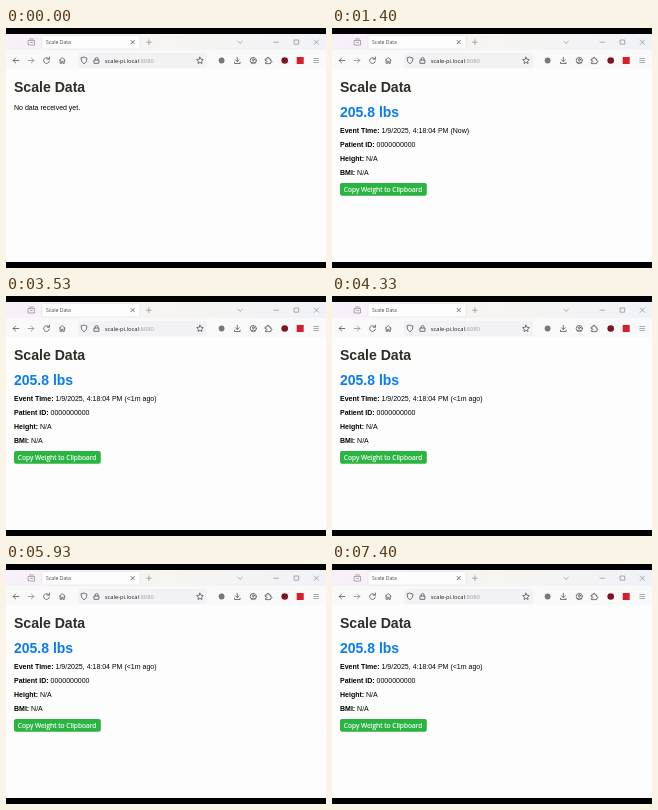
These frames come from a looping animation (320x240 px, 7.47 s). An HTML page:

```html
<!DOCTYPE html>
<html lang="en">
<head>
<meta charset="utf-8">
<title>Scale Data</title>
<style>
  html, body { margin: 0; width: 100%; height: 100%; overflow: hidden; background: #000; }
  svg { display: block; width: 100vw; height: 100vh; }
  text { font-family: "Liberation Sans", Arial, sans-serif; font-size: 7px; fill: #000; white-space: pre; }
  .title { font-size: 14.1px; font-weight: bold; fill: #2e2e28; }
  .weight { font-size: 14px; font-weight: bold; fill: #0a7cf2; }
  .bold { font-weight: bold; }
  .ui { font-family: "Open Sans", "Noto Sans", sans-serif; }
  .icon { fill: none; stroke: #55545a; stroke-width: .8; stroke-linecap: round; stroke-linejoin: round; }
  .faint { stroke: #77767c; stroke-width: .6; }
</style>
</head>
<body>
<svg viewBox="0 0 320 240">
  <defs>
    <linearGradient id="strip">
      <stop offset="0" stop-color="#f8f0fa"/>
      <stop offset=".5" stop-color="#f6f5f1"/>
      <stop offset="1" stop-color="#f1f2f8"/>
    </linearGradient>
  </defs>
  <rect width="320" height="240" fill="#000"/>
  <rect y="6" width="320" height="228" fill="#fdfdfd"/>
  <rect y="6" width="320" height="16" fill="url(#strip)"/>
  <rect y="22" width="320" height="19" fill="#f9f9fa"/>

  <rect x="36" y="7.5" width="98" height="13.5" rx="1.5" fill="#fdfdfe" stroke="#e2e1e6" stroke-width=".6"/>
  <text class="ui" x="40" y="16" style="font-size:5.15px;fill:#4a494f">Scale Data</text>
  <rect x="72" y="25" width="129" height="15" rx="2" fill="#f2f2f4"/>
  <text class="ui" x="98.7" y="34.8" style="font-size:5.8px;fill:#222">scale-pi.local<tspan fill="#a09fa4">:8080</tspan></text>

  <g class="icon">
    <!-- tab strip and window controls -->
    <g class="faint">
      <path d="M22.5 12.5h6v4.5h-6zM23.5 11h4M24.5 14.5h2"/>
      <path d="M140.5 14.2h4.8m-2.4-2.4v4.8M232 13.2l2.2 2.2 2.2-2.2"/>
      <path d="M268 14.2h4.4M288.500 12h4.200v4.200h-4.200zM308.200 12l4.400 4.400m0-4.400l-4.400 4.400"/>
    </g>
    <path d="M125 12.400l3.400 3.400m0-3.400l-3.400 3.400"/>
    <!-- navigation -->
    <path d="M12.800 32.500H7.200m2.500-2.500l-2.500 2.500 2.500 2.500"/>
    <path d="M22.200 32.500h5.600m-2.500-2.500l2.500 2.500-2.500 2.500" stroke="#8d8c93"/>
    <path d="M43 31a2.900 2.900 0 1 0 .4 2.200M43.400 29v2.200h-2.200"/>
    <path d="M53.300 32.300l2.900-2.700 2.900 2.700M54.100 31.800v3.500h1.500v-2h1.200v2h1.500v-3.500"/>
    <!-- address bar -->
    <path d="M78 29.200l3 1q.1 4-3 5.700q-3.100-1.700-3-5.700z"/>
    <path d="M88.300 32h4.600v3.300h-4.600zM89.200 32v-1.100a1.400 1.400 0 0 1 2.800 0V32"/>
    <path d="M194 29.200l1 2.100 2.300.3-1.700 1.600.4 2.300-2-1.100-2 1.100.4-2.300-1.700-1.600 2.300-.3z"/>
    <!-- tools -->
    <path d="M231.300 29.300v4.200m-1.800-1.700l1.800 1.800 1.800-1.800M228.500 34.200v1.300h5.600v-1.300"/>
    <circle cx="247.300" cy="32.500" r="3.100"/>
    <circle cx="247.300" cy="31.700" r="1"/>
    <path d="M245.300 34.700q2-1.800 4 0"/>
    <path d="M259.500 31h1.500q-.4-1.800 1-1.800t1 1.800h1.600v1.600q1.300-.2 1.300.9t-1.300.9v1.200h-5.100v-1.300q1.500-.1 1.500-.9t-1.500-.9z"/>
    <path class="faint" d="M307.800 30.500h4.800m-4.800 2h4.800m-4.800 2h4.800"/>
  </g>
  <circle cx="215.600" cy="32.500" r="2.900" fill="#77767c"/>
  <circle cx="278.700" cy="32.500" r="3.300" fill="#7c1420"/>
  <rect x="290.700" y="29" width="7" height="7" fill="#d5202b"/>

  <text class="title" x="7.900" y="63.800">Scale Data</text>
  <text id="empty" x="8" y="82.200">No data received yet.</text>
  <g id="reading">
    <text class="weight" x="8" y="89.200">205.8 lbs</text>
    <text x="8" y="105.200"><tspan class="bold">Event Time:</tspan> 1/9/2025, 4:18:04 PM (<tspan id="age">Now</tspan>)</text>
    <text x="8" y="119.200"><tspan class="bold">Patient ID:</tspan> 0000000000</text>
    <text x="8" y="133.200"><tspan class="bold">Height:</tspan> N/A</text>
    <text x="8" y="147.200"><tspan class="bold">BMI:</tspan> N/A</text>
    <rect x="8" y="154.900" width="86.800" height="12.900" rx="2" fill="#2bb442"/>
    <text class="ui" x="11.800" y="163.800" style="font-size:6.65px;fill:#fff;stroke:#fff;stroke-width:.15">Copy Weight to Clipboard</text>
  </g>
</svg>
<script>
  const LOOP = 7470, RECEIVED = 800, AGED = 2870;
  const [empty, reading, age] = ["empty", "reading", "age"].map(id => document.getElementById(id));
  const show = (node, on) => node.setAttribute("visibility", on ? "visible" : "hidden");

  function render(time) {
    const t = time % LOOP;
    show(empty, t < RECEIVED);
    show(reading, t >= RECEIVED);
    age.textContent = t < AGED ? "Now" : "<1m ago";
  }

  const start = performance.now();
  function tick() {
    render(performance.now() - start);
    requestAnimationFrame(tick);
  }
  tick();
</script>
</body>
</html>
```
